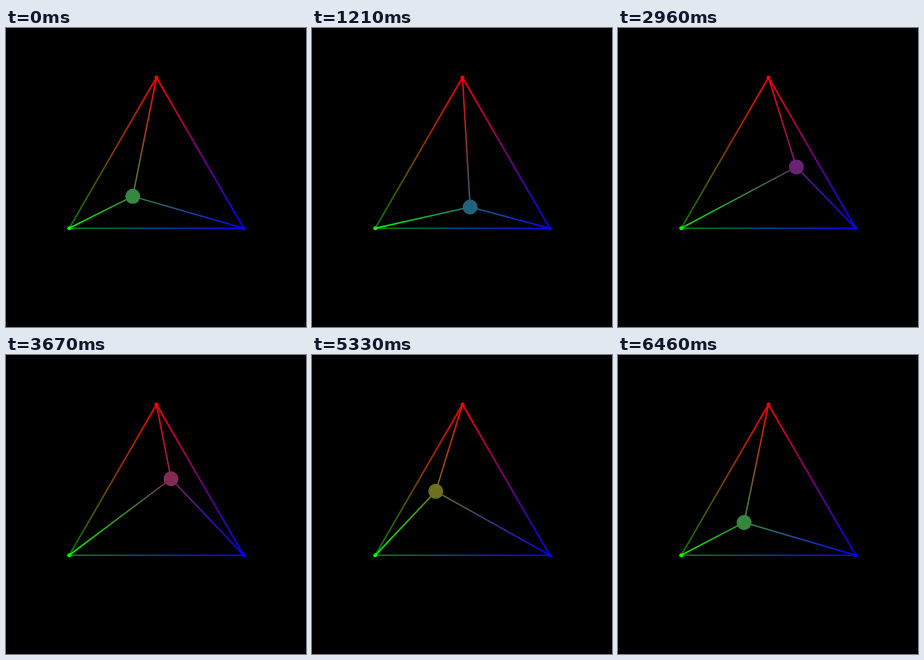
These frames come from a looping animation (300x299 px, 6500 ms). An HTML page with a canvas:

```html
<!DOCTYPE html>
<html>
<head>
<meta charset="utf-8">
<title>Colour triangle</title>
<style>
html, body { margin: 0; width: 100%; height: 100%; overflow: hidden; background: #000; }
canvas { display: block; }
</style>
</head>
<body>
<canvas id="stage" width="300" height="299"></canvas>
<script>
const ctx = document.getElementById('stage').getContext('2d');
const LOOP = 6500, ORBIT = 30, START = 142.3 * Math.PI / 180;
const center = { x: 150.5, y: 150 };

// Corners; edge is the colour used on the triangle's sides.
const red = { x: 150.5, y: 49.5, color: '#f00', edge: '#f00' };
const green = { x: 63.3, y: 200.2, color: '#0f0', edge: '#008000' };
const blue = { x: 237.7, y: 200.2, color: '#00f', edge: '#00f' };
const corners = [red, green, blue];

function line(a, b, from, to) {
  const g = ctx.createLinearGradient(a.x, a.y, b.x, b.y);
  g.addColorStop(0, from);
  g.addColorStop(1, to);
  ctx.strokeStyle = g;
  ctx.beginPath();
  ctx.moveTo(a.x, a.y);
  ctx.lineTo(b.x, b.y);
  ctx.stroke();
}

function disc(p, radius, color) {
  ctx.fillStyle = color;
  ctx.beginPath();
  ctx.arc(p.x, p.y, radius, 0, 2 * Math.PI);
  ctx.fill();
}

// Barycentric weights of the point give its red, green and blue parts.
function mix(p) {
  const r = (green.y - p.y) / (green.y - red.y);
  const lean = (red.x - p.x) / (red.x - green.x);
  const g = (1 - r + lean) / 2;
  const parts = [r, g, 1 - r - g].map(w => Math.round(255 * w));
  return `rgb(${parts})`;
}

function draw(time) {
  const angle = START - 2 * Math.PI * (time % LOOP) / LOOP;
  const ball = {
    x: center.x + ORBIT * Math.cos(angle),
    y: center.y + ORBIT * Math.sin(angle)
  };
  const color = mix(ball);

  ctx.fillStyle = '#000';
  ctx.fillRect(0, 0, 300, 299);
  ctx.lineWidth = 1.5;
  corners.forEach((c, i) => {
    const next = corners[(i + 1) % 3];
    line(c, next, c.edge, next.edge);
  });
  corners.forEach(c => line(c, ball, c.color, color));
  corners.forEach(c => disc(c, 2, c.color));
  disc(ball, 7.5, color);
}

function tick() {
  draw(performance.now());
  requestAnimationFrame(tick);
}
tick();
</script>
</body>
</html>
```
